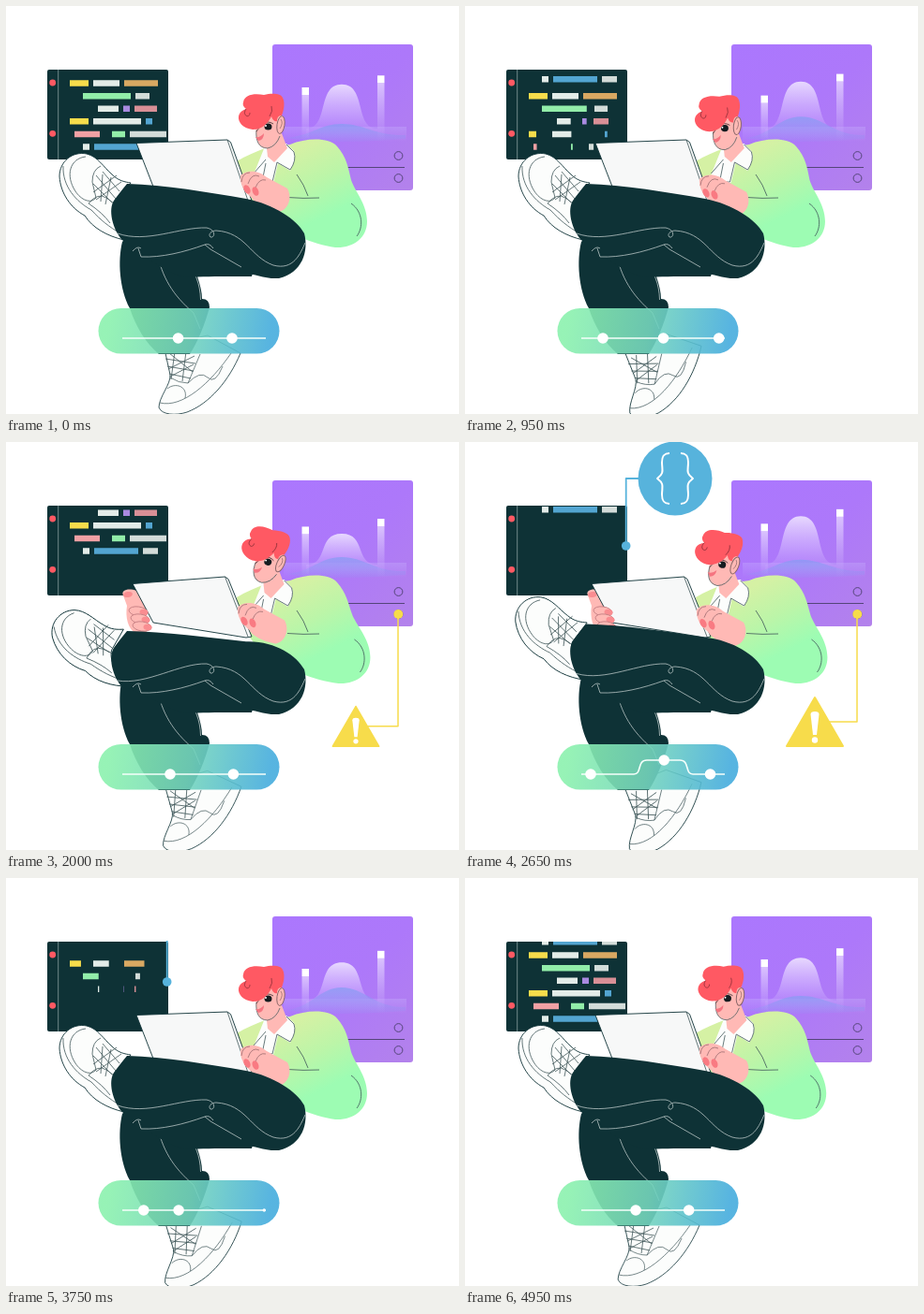
These frames come from a looping animation (483x436 px, 5 s). An HTML page with a canvas:

```html
<!DOCTYPE html>
<html>
<head>
<meta charset="utf-8">
<style>
html, body { margin: 0; height: 100%; overflow: hidden; background: #fff; }
canvas { display: block; }
</style>
</head>
<body>
<canvas id="stage" width="483" height="436"></canvas>
<script>
const ctx = document.getElementById('stage').getContext('2d');
const LOOP = 5000, STEP = 50;
const DARK = '#0e3236', WHITE = '#fcfdfc', SKIN = '#ffb9b5', RED = '#ff5963',
      YELLOW = '#f7dc4b', BLUE = '#57b3dc', SEAM = '#a5b5b5', INK = '#40575a';

const clamp = u => Math.max(0, Math.min(1, u));
const ramp = (t, start, length) => { const u = clamp((t - start) / length); return u * u * (3 - 2 * u); };
// Rises to 1 from the moment "on", falls back to 0 from the moment "off".
const pulse = (t, on, off, length) => ramp(t, on, length) - ramp(t, off, length);
// Sine with a whole number of turns per loop.
const wave = (t, turns, phase = 0) => Math.sin(2 * Math.PI * (turns * t / LOOP + phase));

function shape(d, fill, line, width = 0.9) {
  const path = new Path2D(d);
  if (fill) { ctx.fillStyle = fill; ctx.fill(path); }
  if (line) { ctx.strokeStyle = line; ctx.lineWidth = width; ctx.stroke(path); }
}

function rect(x, y, w, h, fill, r = 0) {
  ctx.fillStyle = fill;
  ctx.beginPath();
  ctx.roundRect(x, y, w, h, r);
  ctx.fill();
}

function oval(x, y, rx, ry, fill, line, tilt = 0) {
  ctx.beginPath();
  ctx.ellipse(x, y, rx, ry, tilt, 0, 7);
  if (fill) { ctx.fillStyle = fill; ctx.fill(); }
  if (line) { ctx.strokeStyle = line; ctx.lineWidth = 1; ctx.stroke(); }
}

const dot = (x, y, r, fill, line) => oval(x, y, r, r, fill, line);

function fade(x0, y0, x1, y1, ...colors) {
  const g = ctx.createLinearGradient(x0, y0, x1, y1);
  colors.forEach((c, i) => g.addColorStop(i / (colors.length - 1), c));
  return g;
}

// Draws with a shift and a turn about the pivot (px, py).
function posed(dx, dy, deg, px, py, draw) {
  ctx.save();
  ctx.translate(px + dx, py + dy);
  ctx.rotate(deg * Math.PI / 180);
  ctx.translate(-px, -py);
  draw();
  ctx.restore();
}

function scaled(x, y, s, draw) {
  ctx.save();
  ctx.translate(x, y);
  ctx.scale(s, s);
  draw();
  ctx.restore();
}

function growingLine(d, length, part, color, width) {
  if (part <= 0) return;
  ctx.setLineDash([length * part, length * 2]);
  shape(d, null, color, width);
  ctx.setLineDash([]);
}

// A code row: left edge, then words as width and color, 5 apart.
const PALE = '#e3ece8', GREY = '#d3dcd9', SKY = '#53a5d1', GREEN = '#92eda9', GAP = '#0000';
const rows = [
  [68, [20, YELLOW], [28, PALE], [36, '#d9a862']],
  [82, [51, GREEN], [15, GREY]],
  [98, [22, PALE], [7, '#a98ae0'], [24, '#d88f96']],
  [68, [20, YELLOW], [51, PALE], [7, SKY]],
  [73, [27, '#f0a0a4'], [3, GAP], [14, GREEN], [39, GREY]],
  [82, [7, PALE], [47, SKY], [16, GREY]]
];
// Blocks of rows are typed, climb into place and then scroll out.
const blocks = [
  { typed: -2000, settle: 0, leave: 0, speed: 0.076 },
  { typed: 546, settle: 1150, leave: 1500, speed: 0.068 },
  { typed: 3550, settle: 3867, leave: 3867, speed: 0.076 },
  { typed: 4133, settle: 4950, leave: LOOP, speed: 0.083 }
];

function codePanel(t) {
  ctx.save();
  ctx.beginPath();
  ctx.roundRect(44, 68, 129, 96, 2);
  ctx.clip();
  rect(44, 68, 129, 96, DARK);
  shape('M55.7 68V164', null, '#71898a', 1);
  dot(49.7, 82, 3.4, RED);
  dot(49.7, 136.3, 3.4, RED);
  for (const { typed, settle, leave, speed } of blocks) {
    const top = 79.3 + speed * (Math.max(0, settle - t) - Math.max(0, t - leave));
    rows.forEach(([x, ...words], i) => {
      const grown = clamp((t - typed - i * 90) / 335);
      for (const [w, color] of words) {
        rect(x, top + i * 13.6, w * grown, 6.5, color);
        x += w + 5;
      }
    });
  }
  ctx.restore();
}

function chartPanel(t) {
  rect(284, 41, 150, 156, fade(284, 41, 434, 197, '#ab77fe', '#ad78fa', '#b382eb'), 3);
  rect(296, 129, 131, 16, fade(0, 129, 0, 145, '#c9b8ff50', '#c9b8ff00'));
  const peak = 87 - 13 * wave(t, 2, 0.04);
  shape(`M320 131C345 131 331 ${peak} 358 ${peak}S371 131 396 131V144H320Z`,
    fade(0, peak, 0, 143, '#f0e6ffe0', '#d6bcff90', '#c8a8ff00'));
  const hill = 121.5 + 4.5 * wave(t, 2, 0.25);
  shape(`M298 141C326 139 334 ${hill} 358 ${hill}S394 139 426 138V142Q390 145 358 145T298 141Z`,
    fade(0, hill, 0, 145, '#869df3c0', '#9592f430'));
  const bars = [[315.5, 92 - 5 * wave(t, 2, 0.25)], [396, 70 + (peak - 76) * 0.55]];
  for (const [x, y] of bars) {
    rect(x, y + 8, 7.5, 137 - y, fade(0, y + 8, 0, 145, '#eee4ffb0', '#d8c4ff00'));
    rect(x, y, 7.5, 8, '#fff');
  }
  shape('M296 172.5H425', null, '#544579', 1);
  dot(418.5, 160, 4.4, null, '#544579');
  dot(418.5, 184, 4.4, null, '#544579');
}

function alertSign(t) {
  dot(418.3, 184, 5 * pulse(t, 1200, 3400, 200), YELLOW);
  const swell = 0.82 + 0.18 * ramp(t, 2400, 250);
  const size = swell * pulse(t, 1550, 2670, 200);
  growingLine(`M418 184V${326 - 27 * swell}H${373 + 15 * swell}`, 160,
    pulse(t, 1300, 2700, 350), YELLOW, 1.5);
  scaled(373, 326, size, () => {
    shape('M0 -53L30 -1H-30Z', YELLOW, YELLOW, 2);
    shape('M-4.5 -35Q-4.5 -38 0 -38T4.5 -35L2 -13H-2Z', '#fff');
    dot(0, -7.5, 3.2, '#fff');
  });
}

function braceBadge(t) {
  const r = 29 * pulse(t, 2350, 3430, 250) + 10.5 * pulse(t, 2400, 2660, 190);
  growingLine('M171.7 111V39H187', 88, pulse(t, 2200, 3650, 200), BLUE, 1.8);
  dot(171.7, 111, 4.8 * pulse(t, 2100, 3800, 150), BLUE);
  scaled(184.5 + r, 39, r / 39.5, () => {
    dot(0, 0, 39.5, BLUE);
    for (let side = 0; side < 2; side++) {
      shape('M-6 -27C-12 -27 -14 -24 -14 -17C-14 -9 -11 -6 -19 0C-11 6 -14 9 -14 17C-14 24 -12 27 -6 27', null, '#fff', 2);
      ctx.scale(-1, 1);
    }
  });
}

function torso({ lean, elbow: e }) {
  shape(`M246 166C256 160 266 156 276 152L303 148C320 141 344 140 353 150C363 161 365 173 ${368 + e / 2} 186
    C${372 + e} 198 ${385 + e} 212 ${385 + e} 230C${385 + e} 248 ${370 + e} 259 ${351 + e} 258C326 254 305 245 270 222L250 196Z`,
    fade(305, 155, 340, 225, '#d5f1a4', '#bcf5a8', '#9dfcb3'));
  shape(`M${368 + e} 211C${381 + e} 220 ${381 + e} 237 ${374 + e} 246M310 180Q318 191 322 203M300 204.5Q317 206 334 205`, null, INK, 0.8);
  posed(lean * 0.7, 0, 0, 0, 0, () => {
    shape('M276 150L264 180L274 189H285L290 168L303 176Q311 163 307 155L299 147Z', WHITE);
    shape('M264 179L277 164M277 168L273 188H284L289 167L303 175Q310 165 307 156L299 148', null, INK, 0.8);
  });
}

function head({ lean, nod, turn }) {
  posed(lean, 0, 0, 0, 0, () => shape('M277 143L279 161L286 167L300 152L294 136Z', SKIN));
  posed(lean, nod, turn, 286, 140, () => {
    shape('M268 120C266 128 266 134 267 140C268 148 272 152 278 152C286 151 292 145 293 137L295 118L285 108Z', SKIN);
    shape('M267 133C266 143 269 152 279 152Q288 150 292 139', null, INK, 0.7);
    oval(293, 127, 4, 9.5, SKIN, '#8a6668', 0.15);
    shape('M293 121Q296 125 292 131', null, '#8a6668', 0.7);
    shape('M266 140Q271 141 275 136Q275 143 269 144Z', '#f57480');
    oval(279.5, 129, 4, 3.6, '#141c20');
    dot(277, 128, 1, '#fff');
    shape('M271 127Q269 132 267 134M274 126Q279 122 285 126', null, '#3c2a2e', 0.8);
    shape(`M253 103C254 94 266 93 275 95C283 93 293 93 295 98C298 104 296 112 294 117C290 117 289 120 289 123
      C286 124 284 121 283 118C280 124 274 132 263 132C253 131 247 124 248 118C249 113 253 111 256 110C253 108 252 105 253 103Z`, RED);
    shape('M256 110C251 117 260 121 260 114M281 118Q285 112 283 107', null, '#8d3039', 0.8);
  });
}

function laptop(t, { tilt }) {
  const hold = pulse(t, 1350, 3250, 300);
  const hx = 28 * (1 - hold) + 6 * ramp(t, 2000, 600), hy = -14 * ramp(t, 2750, 450);
  if (hold) posed(hx, hy, 0, 0, 0, () => {
    shape('M125 164C122 158 131 156 139 159L150 172V204H138C130 200 127 187 129 175Z', SKIN);
    oval(130, 163, 5, 3, '#f98d91', null, -0.2);
  });
  const left = 139 - 4 * tilt, top = 146.5 + 5 * tilt, right = 236 - 2.5 * tilt, y = 143 + tilt;
  shape(`M${left} ${top}L${right} ${y}L${right + 3.5} ${y + 2.5}L262 208L256 209L157 193Z`, '#f7f8f8', DARK, 0.9);
  shape(`M${right} ${y}L258 208`, null, INK, 0.8);
  if (hold && tilt > 0.4) posed(hx, hy, 0, 0, 0, () => {
    for (let i = 0; i < 3; i++) {
      const x = 141 + 2 * i, fy = 181 + 8 * i;
      oval(x, fy, 10, 5, SKIN, '#c98386', 0.15);
      oval(x + 6, fy + 1, 4.5, 3.2, '#f98d91', null, 0.15);
    }
  });
}

function typingHand(t, { tilt }) {
  posed(-3 * tilt, 2 - 2 * wave(t, 3, 0.25) - 6 * tilt, 0, 0, 0, () => {
    shape('M250 181C258 174 270 176 278 183L300 195C306 206 300 219 290 220C276 217 266 212 262 205C254 199 249 190 250 181Z', SKIN);
    shape('M251 188Q252 178 260 178M258 190Q262 178 270 182M266 194Q270 184 277 186', null, '#9c6c70', 0.8);
    oval(257, 196, 3.2, 5, '#f97a82', null, -0.5);
    oval(266, 198, 3.2, 5, '#f97a82', null, -0.4);
  });
}

function lowerShoe(t) {
  posed(0, 0, 5 * wave(t, 3, 0.25) - 5, 205, 355, () => {
    shape('M168 362L175 394C176 404 163 418 163 429C166 437 181 438 193 434C217 425 238 400 250 371L215 352Z', WHITE, DARK, 0.8);
    shape('M164 424C188 430 218 403 240 371M172 409C180 402 194 406 191 419M194 403Q207 389 215 397T231 385M175 397Q184 403 194 403L207 372', null, INK, 0.7);
    shape('M170 377L202 382M172 385L200 390M174 393L197 398M174 371L199 391M201 374L173 388M200 383L175 396M180 369L176 399M192 369L188 401', null, INK, 0.8);
  });
}

function upperShoe(drop) {
  posed(0, drop, -drop, 125, 225, () => {
    shape(`M57 182C57 166 71 155 86 158C98 161 104 172 113 180C120 187 127 188 133 189L116 208C110 220 118 239 126 250
      C108 246 92 237 84 224C69 216 58 200 57 182Z`, WHITE, DARK, 0.9);
    shape('M61 171C60 193 75 209 91 218C101 229 110 236 122 243M85 161C68 163 63 181 74 198C80 207 90 212 96 205M88 211Q98 199 107 205T117 214M88 211Q103 221 111 232M96 205L92 188Q92 175 101 171', null, INK, 0.8);
    shape('M96 181L117 206M93 190L113 210M103 177L121 198M118 181L93 199M123 188L96 207M103 180L101 209M112 183L106 212', null, INK, 0.8);
  });
}

function legs(t) {
  const drop = 12 * pulse(t, 1300, 2300, 600);
  lowerShoe(t);
  shape('M124 252C119 272 121 303 132 323C139 344 149 360 163 372H196C205 358 212 340 217 322Q217 313 209 313C209 306 207 298 204 289H262L280 230L140 235Z', DARK);
  shape('M161 262C166 290 178 309 200 328L207 345M192 274C202 284 207 297 207.5 314', null, SEAM);
  upperShoe(drop);
  shape(`M129 ${190 + drop}C170 ${191 + drop} 215 ${199 + drop * 0.8} 256 ${206 + drop * 0.6}C286 212 310 228 318 243C323 262 316 285 291 291
    C276 292 265 286 255 286C230 289 210 290 188 289C170 284 143 266 124 ${250 + drop}C113 ${238 + drop} 109 ${217 + drop} 115 ${208 + drop}Q120 ${201 + drop} 129 ${190 + drop}Z`, DARK);
  shape(`M119 ${243 + drop}C150 ${254 + drop / 2} 185 236 214 237C224 239 223 248 218 247C215 244 219 240 224 240C256 242 260 268 285 277C307 283 314 264 319 253
    M141 259L144 268C166 269 190 263 212 255L218 260L251 279M144 259Q140 256 135 262M212 255Q217 253 221 259`, null, SEAM);
}

// Paths of the slider nodes as [time, x] points; they may run on past the loop.
const nodes = [
  [[700, 124], [950, 147], [2000, 175], [3250, 246.5], [3780, 277]],
  [[2430, 124], [5000, 241], [6150, 277]],
  [[2975, 124], [7650, 261.5], [8200, 277]]
];

function slider(t) {
  const squash = pulse(t, 3050, 3250, 200);
  const x = 98.5 - 2.7 * squash, y = 323 + 2 * squash;
  ctx.globalAlpha = 0.9;
  rect(x, y, 390 - 2 * x, 694.5 - 2 * y, fade(110, 335, 280, 362, '#8bf1ae', '#75d6bd', '#45acdd'), 24.2);
  ctx.globalAlpha = 1;
  const lift = 15 * pulse(t, 2250, 2700, 350), high = 355 - lift;
  shape(`M124 355H180C189 355 183 ${high} 194 ${high}H229C240 ${high} 234 355 243 355H277`, null, '#f6fffb', 1.6);
  for (const path of nodes) {
    for (const time of [t, t + LOOP]) {
      const i = path.findIndex(([end]) => time < end);
      if (i < 1) continue;
      const [t0, x0] = path[i - 1], [t1, x1] = path[i];
      const nx = x0 + (x1 - x0) * (time - t0) / (t1 - t0);
      const onBump = ramp(32 - Math.abs(nx - 211.5), 0, 14);
      dot(nx, 355 - lift * onBump, 5.8 * clamp(Math.min(nx - 124, 277 - nx) / 6), '#fff');
    }
  }
}

function frame() {
  const t = Math.floor(performance.now() % LOOP / STEP) * STEP;
  const tilt = pulse(t, 1300, 2700, 450), sway = wave(t, 2);
  const body = {
    tilt,
    lean: -3.2 * sway - 6.5 * tilt,
    nod: 2 * sway + 2.5 * tilt,
    turn: -3 * sway + 13 * tilt,
    elbow: 2 * tilt - 1.5 * sway
  };
  rect(0, 0, 483, 436, '#fff');
  codePanel(t);
  chartPanel(t);
  alertSign(t);
  braceBadge(t);
  torso(body);
  head(body);
  laptop(t, body);
  typingHand(t, body);
  legs(t);
  slider(t);
  requestAnimationFrame(frame);
}

ctx.lineJoin = 'round';
frame();
</script>
</body>
</html>
```
